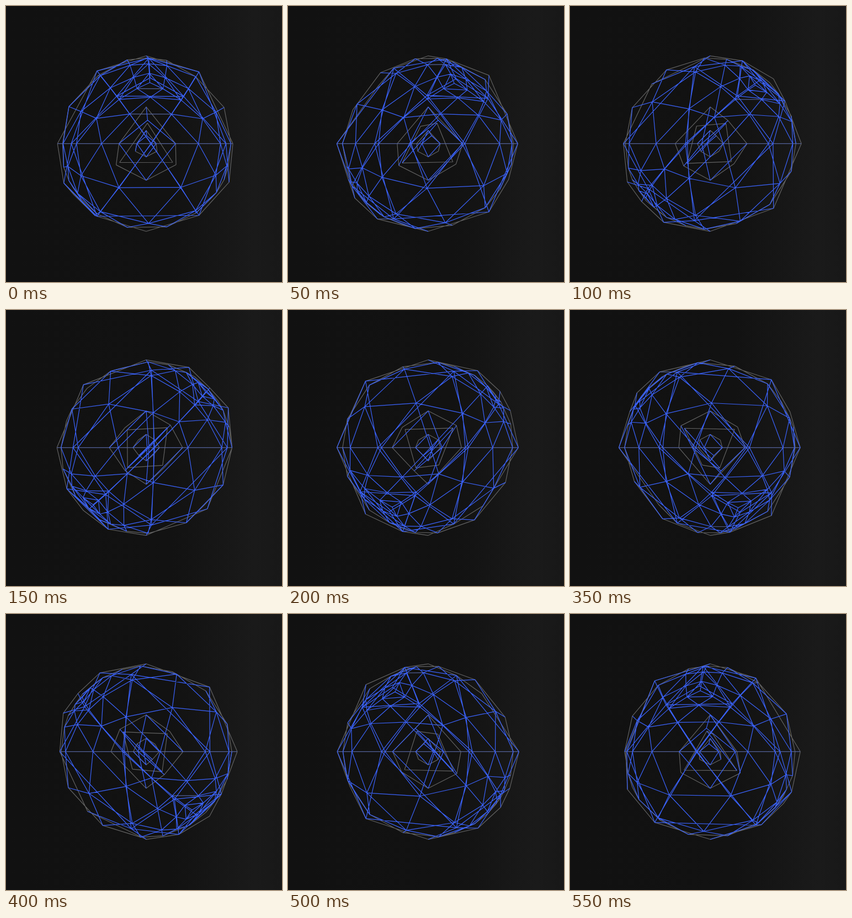
These frames come from a looping animation (500 by 500 pixels, 600 ms). An HTML page with a canvas:

```html
<!DOCTYPE html>
<html lang="en">
<head>
<meta charset="utf-8">
<title>Nested wireframe spheres</title>
<style>
  html, body { margin: 0; width: 100%; height: 100%; overflow: hidden; background: #111; }
  canvas { display: block; }
</style>
</head>
<body>
<canvas id="stage" width="500" height="500"></canvas>
<script>
const ctx = document.getElementById('stage').getContext('2d');
const CX = 254, CY = 249.3, CAMERA = 565, STEP = 50;
// Heading of the spheres in degrees, one per step
const HEADINGS = [2.4, 17.8, 33.2, 48.9, 64.6, 79.8, 94.6, 109.2, 123.8, 140.3, 156.8, 173.4];

const u = Math.sqrt(1 / 3), v = Math.sqrt(2 / 3);
const CORNERS = [[0, u, v], [0, u, -v], [v, -u, 0], [-v, -u, 0]];

const dot = (a, b) => a[0] * b[0] + a[1] * b[1] + a[2] * b[2];
const sub = (a, b) => a.map((n, i) => n - b[i]);
const cross = (a, b) => [
  a[1] * b[2] - a[2] * b[1],
  a[2] * b[0] - a[0] * b[2],
  a[0] * b[1] - a[1] * b[0]
];

// Tetrahedron with each edge split in n parts, pushed out to a sphere
function makeBall(radius, n) {
  const points = new Map(), edges = new Map(), faces = [];

  function vertex(weights) {
    const key = weights.join();
    if (!points.has(key)) {
      const p = [0, 1, 2].map(k => weights.reduce((sum, w, i) => sum + w * CORNERS[i][k], 0));
      const scale = radius / Math.hypot(...p);
      points.set(key, p.map(c => c * scale));
    }
    return key;
  }

  function addFace(keys) {
    const [a, b, c] = keys.map(k => points.get(k));
    let normal = cross(sub(b, a), sub(c, a));
    if (dot(normal, a) < 0) normal = normal.map(x => -x);
    const face = { normal, offset: dot(normal, a) };
    faces.push(face);
    keys.forEach((key, i) => {
      const pair = [key, keys[(i + 1) % 3]].sort(), id = pair.join('|');
      if (!edges.has(id)) edges.set(id, { ends: pair.map(k => points.get(k)), faces: [] });
      edges.get(id).faces.push(face);
    });
  }

  for (let skip = 0; skip < 4; skip++) {
    const at = (i, j) => {
      const weights = [i, j, n - i - j];
      weights.splice(skip, 0, 0);
      return vertex(weights);
    };
    for (let i = 0; i < n; i++) {
      for (let j = 0; j < n - i; j++) {
        addFace([at(i, j), at(i + 1, j), at(i, j + 1)]);
        if (i + j < n - 1) addFace([at(i + 1, j), at(i + 1, j + 1), at(i, j + 1)]);
      }
    }
  }
  return { edges: [...edges.values()], faces };
}

const balls = [
  makeBall(24, 2), makeBall(59, 1), makeBall(66.5, 2),
  makeBall(150, 8), makeBall(159, 4)
];

const backdrop = ctx.createLinearGradient(0, 0, 500, 0);
backdrop.addColorStop(0, '#111');
backdrop.addColorStop(0.6, '#121212');
backdrop.addColorStop(0.9, '#1a1a1a');
backdrop.addColorStop(1, '#181818');

function draw(heading) {
  const sin = Math.sin(heading), cos = Math.cos(heading);
  const depth = p => p[2] * cos - p[0] * sin;
  const project = p => {
    const scale = CAMERA / (CAMERA - depth(p));
    return [CX + (p[0] * cos + p[2] * sin) * scale, CY - p[1] * scale];
  };
  const outline = new Path2D(), level = new Path2D(), inside = new Path2D();

  for (const ball of balls) {
    for (const face of ball.faces) face.front = depth(face.normal) * CAMERA > face.offset;
    for (const edge of ball.edges) {
      const shown = edge.faces.filter(face => face.front).length;
      if (!shown) continue;
      const [a, b] = edge.ends.map(project);
      const flat = Math.abs(a[1] - b[1]) < 0.5;
      const path = shown === 1 ? outline : flat ? level : inside;
      path.moveTo(...a);
      path.lineTo(...b);
    }
  }

  ctx.fillStyle = backdrop;
  ctx.fillRect(0, 0, 500, 500);
  ctx.lineWidth = 1.2;
  for (const [path, colour] of [[outline, '#626262'], [level, '#53629a'], [inside, '#3a62fa']]) {
    ctx.strokeStyle = colour;
    ctx.stroke(path);
  }
}

function tick() {
  const step = Math.floor(performance.now() / STEP) % HEADINGS.length;
  draw(HEADINGS[step] * Math.PI / 180);
  requestAnimationFrame(tick);
}
tick();
</script>
</body>
</html>
```
